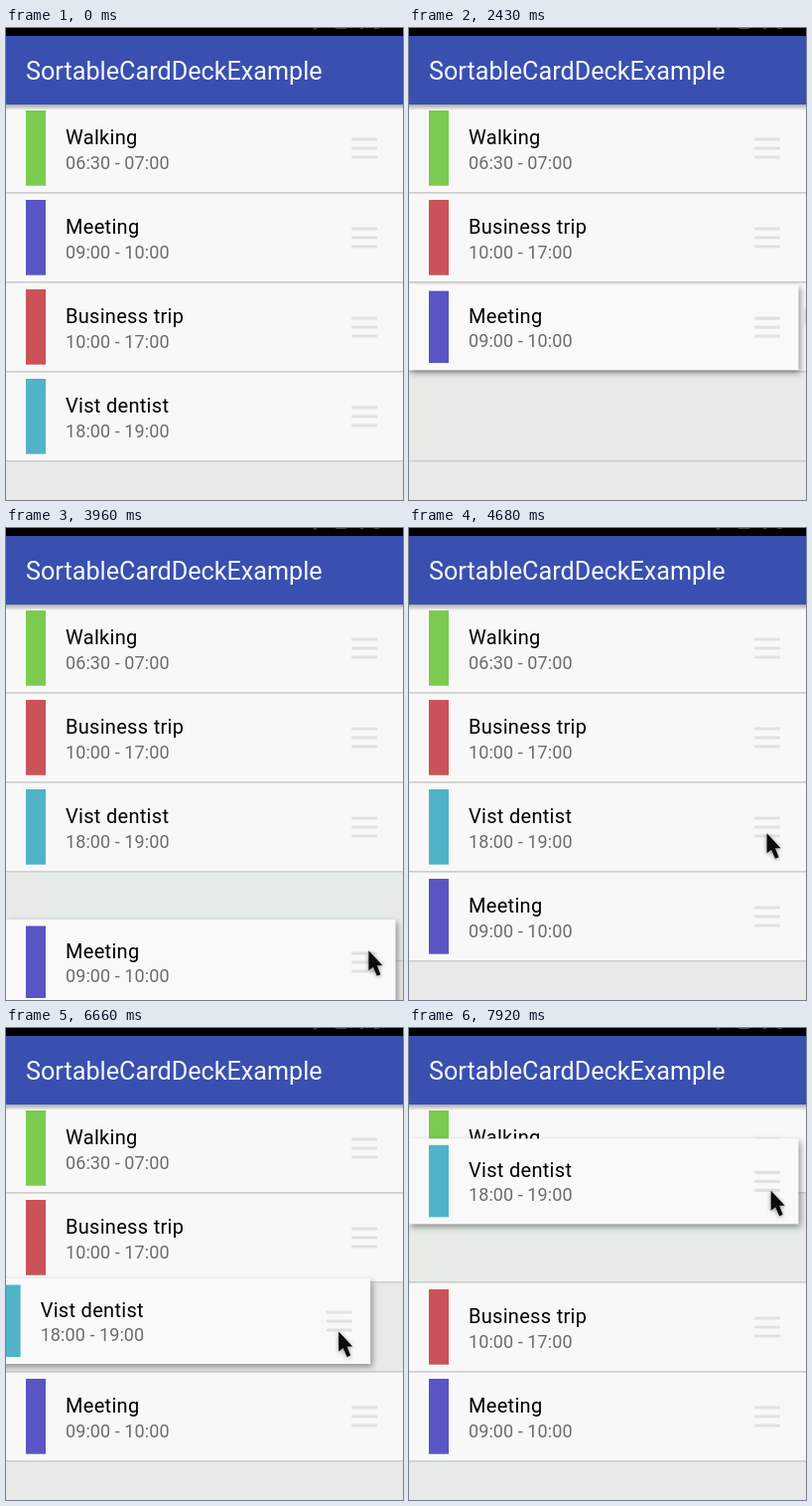
An HTML page that plays this animation: 400x475 px, repeating every 8 s.

```html
<!DOCTYPE html>
<html lang="en">
<head>
<meta charset="utf-8">
<title>Sortable list</title>
<style>
  html, body { margin: 0; width: 100%; height: 100%; overflow: hidden; background: #e8eae8; }
  svg { display: block; width: 400px; height: 475px; font-family: Roboto, sans-serif; }
  .title { font-size: 20px; letter-spacing: .3px; fill: #000; }
  .time { font-size: 18px; letter-spacing: .08px; fill: #6c6c6c; }
  .grip { fill: #e1e1e1; }
  .card { fill: #f8f8f8; }
  .lift .card { fill: #f9f9f9; filter: drop-shadow(2px 3px 3px rgba(0, 0, 0, .4)); }
  #cursor { filter: drop-shadow(.5px 1px 2px rgba(0, 0, 0, .45)); }
</style>
</head>
<body>
<svg viewBox="0 0 400 475">
  <defs>
    <linearGradient id="fade" x2="0" y2="1">
      <stop stop-opacity=".32"/>
      <stop offset="1" stop-opacity="0"/>
    </linearGradient>
  </defs>
  <rect width="400" height="475" fill="#e8eae8"/>
  <rect y="76" width="400" height="359" fill="#e6ebe8"/>
  <path d="M0 165.8H400M0 255.8H400M0 345.8H400M0 435.8H400" stroke="#cdcfcd" stroke-width="1.6"/>
  <g id="rows"></g>
  <rect y="77" width="400" height="6" fill="url(#fade)"/>
  <rect y="8" width="400" height="69" fill="#3950b0"/>
  <rect width="400" height="8"/>
  <path d="M309 0h5l-2.500 2zM332 0h11v1h-11zM357 0h3v1h-3zM371 0h5v1h-5z" fill="#444"/>
  <text x="20" y="51.500" font-size="25.200" fill="#f6f7fc">SortableCardDeckExample</text>
  <path id="cursor" d="M.5 .5V20.500L5 17L9 26L12.500 24.500L8.800 15.500H14.500Z" fill="#0b0b0b"/>
</svg>
<script>
const LOOP = 8000, STEP = 90, TOP = 76, ROW = 90;
const GRIP_X = 360, LAG = 16;

const items = [
  ['Walking', '06:30 - 07:00', '#7acb50'],
  ['Meeting', '09:00 - 10:00', '#5a54c4'],
  ['Business trip', '10:00 - 17:00', '#c95358'],
  ['Vist dentist', '18:00 - 19:00', '#51b3c8']
];

// pointer moves: start, end, and the point each one eases out to
const origin = { x: 311, y: 430 };
const moves = [
  { from: 540, to: 1440, x: 362, y: 201 },
  { from: 1530, to: 2077, x: 412, y: 428 },
  { from: 2250, to: 2823, x: 388, y: 113 },
  { from: 3060, to: 3780, x: 365, y: 427 },
  { from: 3950, to: 4770, x: 360, y: 305 },
  { from: 5270, to: 6039, x: 100, y: 305 },
  { from: 6220, to: 6900, x: 376, y: 305 },
  { from: 7300, to: 8000, x: 364, y: 161 }
];

// grip: how far below the title the pointer holds the card
const drags = [
  { row: 1, from: 1350, to: 4320, grip: 1 },
  { row: 3, from: 4770, to: LOOP, grip: 21 }
];

const set = (el, attrs) => {
  for (const k in attrs) el.setAttribute(k, attrs[k]);
  return el;
};
const svg = (tag, attrs, parent) =>
  parent.appendChild(set(document.createElementNS('http://www.w3.org/2000/svg', tag), attrs));

const list = document.getElementById('rows');
const cursor = document.getElementById('cursor');

const rows = items.map(([title, time, color]) => {
  const g = svg('g', {}, list);
  const card = svg('rect', { class: 'card' }, g);
  const bar = svg('rect', { x: 20, width: 20, fill: color }, g);
  svg('text', { class: 'title', x: 60, y: 7 }, g).textContent = title;
  const sub = svg('text', { class: 'time', x: 60 }, g);
  sub.textContent = time;
  for (let i = 0; i < 3; i++) {
    svg('rect', { class: 'grip', x: 348, y: 0.4 + 9 * i, width: 26, height: 3.2, rx: 1 }, g);
  }
  return { g, card, bar, sub };
});

function place(row, x, y, lifted) {
  set(row.g, { transform: `translate(${x} ${y})` });
  if (row.lifted === lifted) return;
  row.lifted = lifted;
  set(row.g, { class: lifted ? 'lift' : '' });
  set(row.card, lifted ? { y: -32, width: 392.5, height: 86 } : { y: -33, width: 400, height: 88 });
  set(row.bar, lifted ? { y: -25.5, height: 72.5 } : { y: -27, height: 75.7 });
  set(row.sub, { y: lifted ? 30.5 : 31.5 });
  if (lifted) list.appendChild(row.g);
}

function pointer(t) {
  let { x, y } = origin;
  for (const m of moves) {
    if (t < m.from) break;
    const k = Math.sin(Math.min(1, (t - m.from) / (m.to - m.from)) * Math.PI / 2);
    x += (m.x - x) * k;
    y += (m.y - y) * k;
  }
  return { x, y };
}

// the gap follows the pointer one step late
const slotAt = t => Math.max(0, Math.min(3, Math.floor((pointer(t - STEP).y - TOP) / ROW)));

function draw(t) {
  const { x, y } = pointer(t);
  const order = [0, 1, 2, 3];
  let held = -1;
  for (const d of drags) {
    if (t < d.from) break;
    order.splice(order.indexOf(d.row), 1);
    order.splice(slotAt(Math.min(t, d.to)), 0, d.row);
    if (t < d.to) {
      held = d.row;
      place(rows[held], Math.min(0, x - GRIP_X), pointer(t - LAG).y - d.grip, true);
    }
  }
  order.forEach((id, slot) => {
    if (id !== held) place(rows[id], 0, TOP + 34 + slot * ROW, false);
  });
  set(cursor, {
    transform: `translate(${x} ${y})`,
    visibility: t < moves[0].from ? 'hidden' : 'visible'
  });
}

const start = performance.now();
function tick() {
  const t = (performance.now() - start) % LOOP;
  draw(Math.floor(t / STEP) * STEP);
  requestAnimationFrame(tick);
}
tick();
</script>
</body>
</html>
```
